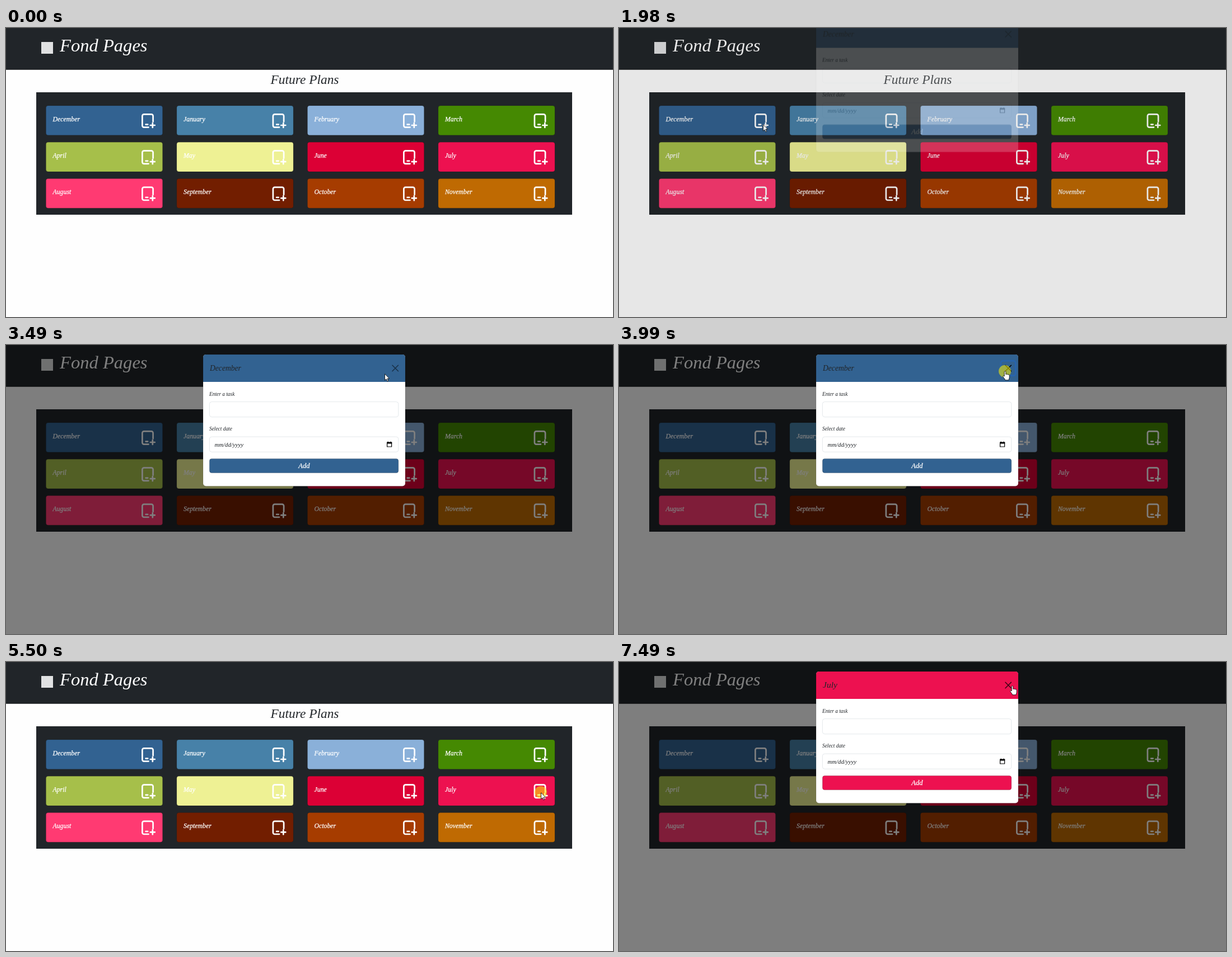
Write an HTML page that moves like this. It is 1084 by 517 pixels and loops after 7.99 s.

```html
<!DOCTYPE html>
<html lang="en">
<head>
<meta charset="utf-8">
<title>Monthly planner</title>
<style>
  html, body { margin: 0; width: 100%; height: 100%; overflow: hidden; background: #fefefe; }
  svg { display: block; width: 1084px; height: 517px; }
  text { font-family: "Liberation Serif", "Noto Serif", serif; font-style: italic; fill: #212529; }
  .white { fill: #fff; }
  .month { font-size: 11.8px; fill: #fff; stroke: #fff; stroke-width: .25; }
  .label { font-size: 9.4px; }
  .icon { fill: none; stroke: #fff; stroke-width: 2.7; stroke-linecap: round; stroke-linejoin: round; }
  .field { fill: #fff; stroke: #dee2e6; stroke-width: .8; }

  .anim { animation: 7990ms step-end infinite; }
  #backdrop { animation-name: backdrop; }
  #modal { animation-name: modal; }
  #tint { animation-name: tint; }
  #first { animation-name: first; }
  #second { animation-name: second; }
  #cross { animation-name: cross; }
  #ring { animation-name: ring; }
  #arrow { animation-name: arrow; }
  #beam { animation-name: beam; }
  #hand { animation-name: hand; }
  #click { animation-name: click; }

  @keyframes backdrop {
    0%, 56.195%, 100% { opacity: 0; }
    24.781% { opacity: .09; }
    31.164%, 74.968% { opacity: .5; }
  }
  @keyframes modal {
    0%, 56.195%, 100% { opacity: 0; transform: none; }
    24.781% { opacity: .2; transform: translateY(-30.5px); }
    31.164%, 74.968% { opacity: 1; transform: none; }
  }
  @keyframes tint {
    0%, 100% { fill: #326291; }
    56.195% { fill: #ed1150; }
  }
  @keyframes first {
    0%, 100% { opacity: 1; }
    56.195% { opacity: 0; }
  }
  @keyframes second {
    0%, 100% { opacity: 0; }
    56.195% { opacity: 1; }
  }
  @keyframes cross {
    0%, 56.195%, 100% { opacity: .5; }
    49.937% { opacity: 1; }
    93.742% { opacity: .75; }
  }
  @keyframes ring {
    0%, 56.195%, 100% { opacity: 0; }
    49.937% { opacity: .25; }
  }
  @keyframes arrow {
    0%, 100% { opacity: 0; transform: translate(476px, 459px); }
    12.265% { opacity: 1; transform: translate(476px, 459px); }
    18.523% { opacity: 1; transform: translate(257px, 178px); }
    24.781% { opacity: 1; transform: translate(257px, 172px); }
    37.296% { opacity: 0; transform: translate(257px, 172px); }
    43.679% { opacity: 1; transform: translate(676px, 51px); }
    49.937% { opacity: 0; transform: translate(676px, 51px); }
    56.195% { opacity: 1; transform: translate(761px, 100px); }
    62.453% { opacity: 1; transform: translate(934px, 240px); }
    68.835% { opacity: 1; transform: translate(955px, 233px); }
    87.484% { opacity: 1; transform: translate(674px, 73px); }
    93.742% { opacity: 0; transform: translate(674px, 73px); }
  }
  @keyframes beam {
    0%, 43.679%, 100% { opacity: 0; }
    37.296% { opacity: 1; }
  }
  @keyframes hand {
    0%, 56.195%, 100% { opacity: 0; transform: translate(685px, 46px); }
    49.937% { opacity: 1; transform: translate(685px, 46px); }
    93.742% { opacity: 1; transform: translate(698px, 42px); }
  }
  @keyframes click {
    0%, 56.195%, 74.968%, 100% { opacity: 0; transform: translate(689px, 47px); }
    49.937% { opacity: .55; transform: translate(689px, 47px); }
    68.835% { opacity: .55; transform: translate(955px, 233px); }
  }
</style>
</head>
<body>
<svg viewBox="0 0 1084 517">
  <defs>
    <path id="add" class="icon" d="M20.6 14.5V4.4a3 3 0 0 0-3-3H4.4a3 3 0 0 0-3 3v17.2a3 3 0 0 0 3 3H12.5M7.6 19.6h3.6M15.8 21h8M19.8 17v8"/>
  </defs>

  <rect width="1084" height="517" fill="#fefefe"/>
  <rect width="1084" height="74.5" fill="#212529"/>
  <rect y="73.5" width="1084" height="1" fill="#16191b"/>
  <rect x="63" y="25" width="21" height="21" fill="#e0e1e2"/>
  <text class="white" x="96" y="42" font-size="32.6">Fond Pages</text>
  <text x="533.5" y="100" font-size="23.4" text-anchor="middle">Future Plans</text>
  <rect x="54" y="115" width="957" height="219" fill="#212529"/>
  <g id="cards"></g>

  <rect id="backdrop" class="anim" width="1084" height="517" opacity="0"/>

  <g id="modal" class="anim" opacity="0">
    <rect x="352" y="17" width="361" height="235.5" rx="5" fill="#fff"/>
    <g id="tint" class="anim" fill="#326291">
      <path d="M352 66V22a5 5 0 0 1 5-5H708a5 5 0 0 1 5 5V66z"/>
      <rect x="363.4" y="203.4" width="337.4" height="25.4" rx="4" stroke="#000" stroke-opacity=".25" stroke-width=".8"/>
    </g>
    <rect x="352" y="17" width="361" height="235.5" rx="5" fill="none" stroke="#000" stroke-opacity=".15" stroke-width=".8"/>
    <text id="first" class="anim" x="364" y="46" font-size="13.6">December</text>
    <text id="second" class="anim" x="364" y="46" font-size="15.5">July</text>
    <rect id="ring" class="anim" x="681.8" y="28.3" width="26.4" height="26.4" rx="4" fill="none" stroke="#0d6efd" stroke-width="3"/>
    <path id="cross" class="anim" d="M690 36.3l10.4 10.4M700.4 36.3L690 46.7" stroke="#000" stroke-width="1.6" stroke-linecap="round"/>

    <text class="label" x="363" y="90.5">Enter a task</text>
    <rect class="field" x="363.4" y="101.6" width="337.4" height="27.2" rx="4"/>
    <text class="label" x="363" y="153">Select date</text>
    <rect class="field" x="363.4" y="164.2" width="337.4" height="27.2" rx="4"/>
    <text x="372.5" y="181.5" font-size="10.8">mm/dd/yyyy</text>
    <path d="M680.6 174.4h8v7.6h-8z" fill="none" stroke="#000" stroke-width="1.2"/>
    <path d="M680 173.8h9.2v2.7H680zM681.6 172.8h1.3v1.5h-1.3zM686.3 172.8h1.3v1.5h-1.3z"/>
    <text class="white" x="532.5" y="220" font-size="12.6" text-anchor="middle" stroke="#fff" stroke-width=".25">Add</text>
  </g>

  <circle id="click" class="anim" r="11" fill="#fff000" opacity="0"/>
  <path id="arrow" class="anim" d="M.5.8V12.2L3.1 9.8 4.9 13.9 6.7 13.1 4.9 9.1H8.5z" fill="#fff" stroke="#000" stroke-width=".8" stroke-linejoin="round" opacity="0"/>
  <path id="beam" class="anim" d="M562.3 98.5h4.4M564.5 98.5v11M562.3 109.5h4.4" fill="none" stroke="#000" opacity="0"/>
  <path id="hand" class="anim" d="M3.2 10V2.1a1.3 1.3 0 0 1 2.6 0V6.6a1.2 1.2 0 0 1 2.2.3 1.2 1.2 0 0 1 2.2.4 1.1 1.1 0 0 1 2 .7V12c0 1.8-1.2 2.6-1.2 4.8H4.6C4.3 14.3 1.8 13 .8 10.4.3 9 2 8.5 2.6 9.4z" fill="#fff" stroke="#000" stroke-width=".8" stroke-linejoin="round" opacity="0"/>
</svg>
<script>
  const months = [
    ["December", "#326291"], ["January", "#4781a8"], ["February", "#8ab0d9"], ["March", "#458902"],
    ["April", "#a6bf4a"], ["May", "#eef194"], ["June", "#dc0035"], ["July", "#ed1150"],
    ["August", "#ff3a72"], ["September", "#721e00"], ["October", "#a63c00"], ["November", "#bf6a02"]
  ];

  const card = ([name, color], i) => {
    const x = 71 + (i % 4) * 233.5;
    const y = 138.6 + Math.floor(i / 4) * 65.2;
    return `<g transform="translate(${x} ${y})">
      <rect x=".4" y=".4" width="208.2" height="52.8" rx="4" fill="${color}" stroke="#000" stroke-opacity=".18" stroke-width=".8"/>
      <text class="month" x="12.5" y="28.4">${name}</text>
      <use href="#add" x="171" y="14.4"/>
    </g>`;
  };

  document.getElementById("cards").innerHTML = months.map(card).join("");
</script>
</body>
</html>
```
